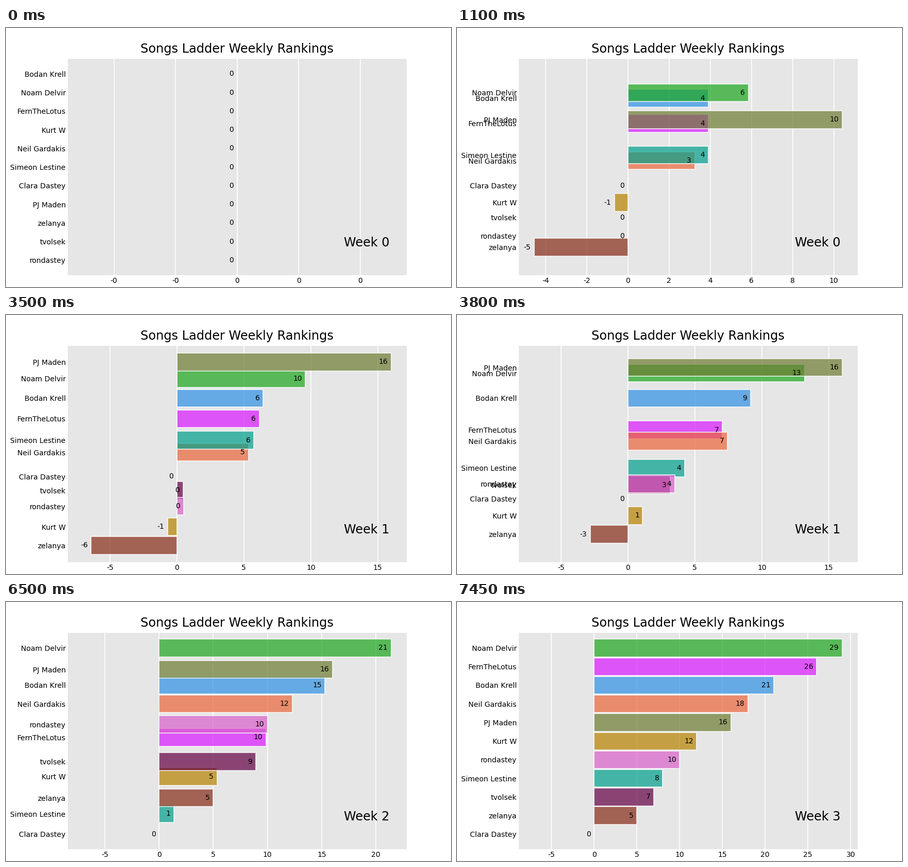
These frames come from a looping animation (864x504 px, 8 s). A matplotlib script:

```python
import numpy as np
import matplotlib.pyplot as plt
from matplotlib.animation import FuncAnimation

FRAME_MS = 50
LOOP_MS = 8000
STEPS = 20          # steps from one week to the next
FIRST_MS = 500      # when the first move starts
WEEK_MS = 3000      # from one move to the next

# name, bar colour, totals for weeks 1 to 3
PLAYERS = [
    ("Bodan Krell", "#2E91E5", 6, 15, 21),
    ("Noam Delvir", "#1CA71C", 9, 21, 29),
    ("FernTheLotus", "#DA16FF", 6, 9, 26),
    ("Kurt W", "#B68100", -1, 5, 12),
    ("Neil Gardakis", "#EB663B", 5, 12, 18),
    ("Simeon Lestine", "#00A08B", 6, 1, 8),
    ("Clara Dastey", "#FC0080", 0, 0, 0),
    ("PJ Maden", "#6C7C32", 16, 16, 16),
    ("zelanya", "#862A16", -7, 5, 5),
    ("tvolsek", "#620042", 0, 9, 7),
    ("rondastey", "#DA60CA", 0, 10, 10),
]
names = [p[0] for p in PLAYERS]
colors = [p[1] for p in PLAYERS]
n = len(PLAYERS)


def rank(totals):
    """Bar positions, n at the top; ties keep the list order."""
    pos = np.empty(n)
    pos[np.argsort(-totals, kind="stable")] = np.arange(n, 0, -1)
    return pos


def tween(weekly):
    """Linear steps between the weekly rows."""
    weekly = np.asarray(weekly, float)
    rows = [a + (b - a) * k / STEPS
            for a, b in zip(weekly, weekly[1:]) for k in range(STEPS)]
    return np.array(rows + [weekly[-1]])


totals = np.array([(0,) + p[2:] for p in PLAYERS], float).T
values = tween(totals)
places = tween([rank(row) for row in totals])
lows = np.minimum.accumulate(values.min(axis=1))
highs = np.maximum.accumulate(values.max(axis=1))


def limits(step):
    lo, hi = lows[step], highs[step]
    if lo == hi:
        lo, hi = lo - 0.05, hi + 0.05
    pad = 0.05 * (hi - lo)
    return lo - pad, hi + pad


def step_at(ms):
    step = 0
    for week in range(len(totals) - 1):
        moved = (ms - FIRST_MS - week * WEEK_MS) // FRAME_MS + 1
        step += min(max(moved, 0), STEPS)
    return step


fig = plt.figure(figsize=(6, 3.5), dpi=144, facecolor="white")
# a 1% margin plus room for the tick labels, in pixels
left, bottom = 0.01 + 111.34 / 864, 0.01 + 18 / 504
ax = fig.add_axes([left, bottom, 0.9 - left, 0.88 - bottom])
ax.set_facecolor("0.9")
ax.grid(True, axis="x", color="white")
ax.set_axisbelow(True)
ax.tick_params(length=0, labelsize=7, pad=2)
ax.set_title("Songs Ladder Weekly Rankings", size=12)
ax.xaxis.set_major_formatter(lambda x, pos: f"{x + 0:,.0f}")
for spine in ax.spines.values():
    spine.set_visible(False)

bars = ax.barh(places[0], values[0], height=0.95, color=colors,
               ec="white", alpha=0.7)
marks = [ax.text(0, 0, "", ha="right", va="center", size=7,
                 transform=ax.transAxes) for _ in names]
week_text = ax.text(0.95, 0.15, "", ha="right", va="center", size=12,
                    transform=ax.transAxes)
Y_LOW, Y_HIGH = 0.2, n + 0.8


def draw(frame):
    step = step_at(frame * FRAME_MS)
    lo, hi = limits(step)
    ax.set_xlim(lo, hi)
    ax.set_yticks(places[step], labels=names)
    ax.set_ylim(Y_LOW, Y_HIGH)
    for bar, mark, v, y in zip(bars, marks, values[step], places[step]):
        bar.set_width(v)
        bar.set_y(y - bar.get_height() / 2)
        mark.set_position(((v - lo) / (hi - lo) - 0.01,
                           (y - Y_LOW) / (Y_HIGH - Y_LOW)))
        mark.set_text(f"{v:,.0f}")
    week_text.set_text(f"Week {step // STEPS}")
    return []


anim = FuncAnimation(fig, draw, frames=LOOP_MS // FRAME_MS,
                     init_func=lambda: draw(0), interval=FRAME_MS,
                     repeat=True, repeat_delay=0)
plt.show()
```
